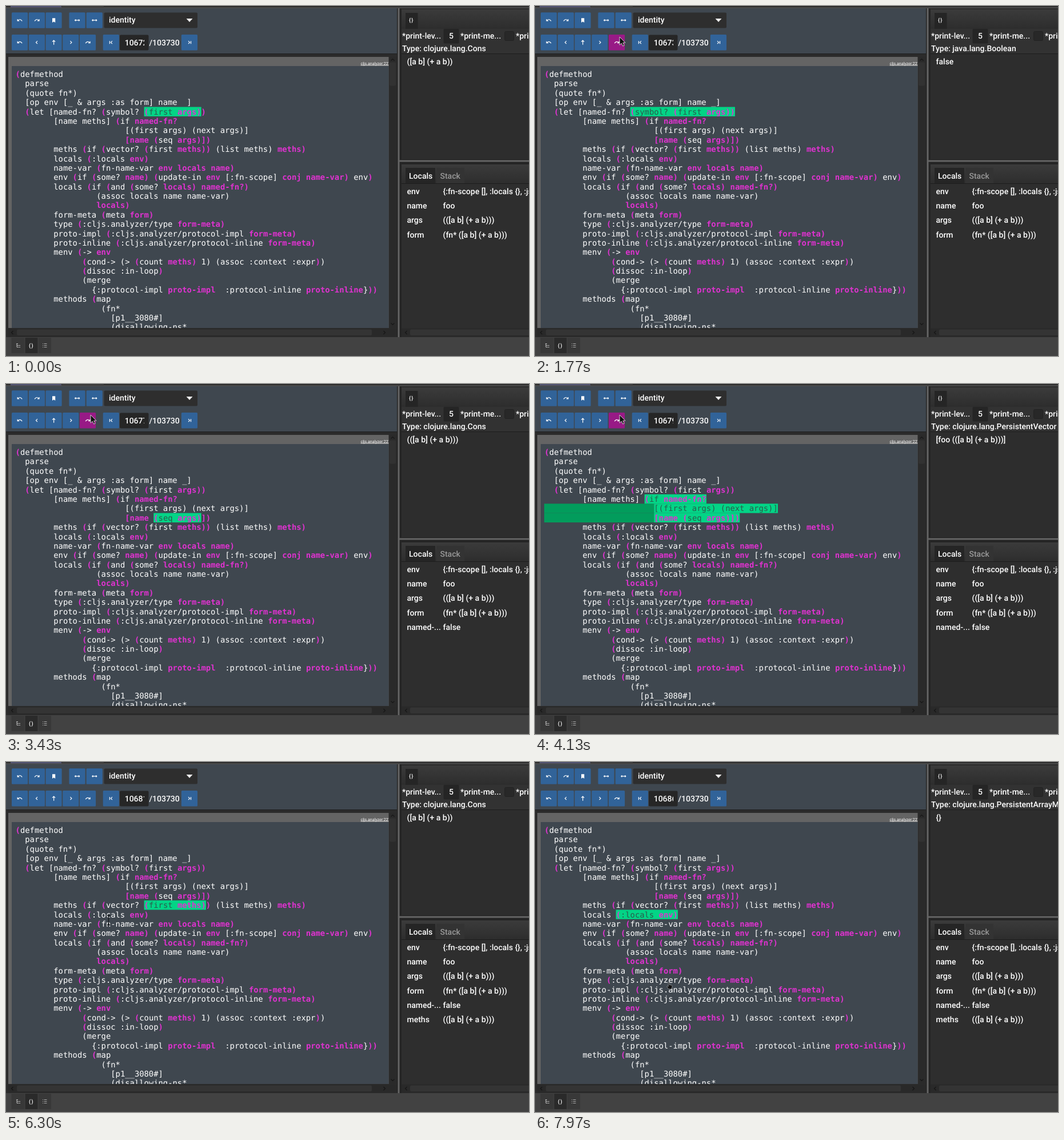
An HTML page for the animation above (8 s loop, 915 px wide and 612 px high).

```html
<!DOCTYPE html>
<html lang="en">
<head>
<meta charset="utf-8">
<title>Stepping debugger</title>
<style>
html, body { margin: 0; width: 100%; height: 100%; overflow: hidden; background: #2b2b2b; }
svg { display: block; width: 915px; height: 612px; }
text { white-space: pre; text-rendering: geometricPrecision; }
.ui { font: 500 14px Roboto, sans-serif; fill: #fff; }
.braces { font-size: 9.5px; letter-spacing: 1px; }
.code { font: 13.84px "DejaVu Sans Mono", monospace; fill: #fff; }
.code .hot { font-weight: bold; fill: #e032d0; }
.code.lit { fill: #2b5a4c; }
.icon { fill: none; stroke: #fff; stroke-width: 1.2; }
</style>
</head>
<body>
<svg id="stage" viewBox="0 0 915 612"></svg>
<script>
const LOOP = 8000, X0 = 16.6, CW = 8.333, Y0 = 111, LH = 16.38, BASE = 13.1;
const pad = n => ' '.repeat(n);

// "~" toggles the emphasised style
const lines = [
  '~(~defmethod',
  '  parse',
  '  (quote fn*)',
  '  [op env [_ & args :as form] name  ]',
  '  ~(~let [named-fn? ~(~symbol? ~(~first ~args))~',
  '        [name meths] ~(~if ~named-fn?',
  pad(23) + '[(first args) (next args)]',
  pad(23) + '~[name (~seq ~args)])',
  '        meths ~(~if ~(~vector? ~(~first ~meths))~ (list meths) ~meths)',
  '        locals ~(~:locals ~env)',
  '        name-var ~(~fn-name-var ~env locals name)',
  '        env ~(~if ~(~some? ~name)~ ~(~update-in ~env~ [:fn-scope] ~conj name-var)~ env~)~',
  '        locals ~(~if ~(~and ~(~some? ~locals)~ ~named-fn?)',
  pad(17) + '(assoc locals name name-var)',
  pad(17) + '~locals)',
  '        form-meta ~(~meta ~form)',
  '        type ~(~:cljs.analyzer/type ~form-meta)',
  '        proto-impl ~(~:cljs.analyzer/protocol-impl ~form-meta)',
  '        proto-inline ~(~:cljs.analyzer/protocol-inline ~form-meta)',
  '        menv ~(~-> ~env',
  pad(14) + '~(~cond-> (> ~(~count ~meths)~ 1) (assoc :context :expr~)~)',
  pad(14) + '~(~dissoc :in-loop~)',
  pad(14) + '(merge',
  pad(16) + '{:protocol-impl ~proto-impl~  :protocol-inline ~proto-inline~}~))',
  '        methods ~(~map',
  pad(18) + '(fn*',
  pad(20) + '[p1__3080#]',
  pad(20) + '(disallowing-ns*'
];

const CONS = 'clojure.lang.Cons', BOOL = 'java.lang.Boolean', VEC = 'clojure.lang.PersistentVector';
const ARG = '([a b] (+ a b))', ARGS = `(${ARG})`, PAIR = `[foo ${ARGS}]`;

// time, step, type, value, lit spans as [row, column, length]
const steps = [
  [0, 10672, CONS, ARG, [[4, 27, 12]]],
  [1130, 10673, BOOL, 'false', [[4, 18, 22]]],
  [1800, 10674, BOOL, 'false', [[5, 25, 9]]],
  [2450, 10675, 'clojure.lang.Symbol', 'foo', [[7, 24, 4]]],
  [2850, 10676, CONS, ARGS, [[7, 34, 4]]],
  [3400, 10677, CONS, ARGS, [[7, 29, 10]]],
  [4030, 10678, VEC, PAIR, [[7, 23, 17]]],
  [4090, 10679, VEC, PAIR, [[5, 21, 13], [6, 23, 26], [7, 23, 18]]],
  [4600, 10680, CONS, ARGS, [[8, 34, 5]]],
  [5530, 10681, CONS, ARG, [[8, 27, 13]]],
  [7000, 10686, 'clojure.lang.PersistentArrayMap', '{}', [[9, 15, 13]]]
];

// time, x, y of the pointer tip
const path = [
  [30, 312, 176], [250, 280, 150], [520, 190, 84], [770, 148, 54], [5680, 148, 54],
  [6020, 160, 150], [6270, 180, 275], [6400, 178, 279], [6750, 148, 267],
  [7770, 148, 267], [7960, 234, 385]
];

const esc = s => s.replace(/&/g, '&amp;').replace(/</g, '&lt;').replace(/>/g, '&gt;');
const rect = (x, y, w, h, fill, more = '') =>
  `<rect x="${x}" y="${y}" width="${w}" height="${h}" fill="${fill}" ${more}/>`;
const label = (x, y, s, more = '') => `<text class="ui" x="${x}" y="${y}" ${more}>${esc(s)}</text>`;
const braces = (x, y, s) => `<text class="ui braces" x="${x}" y="${y}">${s}</text>`;
const icon = (x, y, d, more = '') => `<path class="icon" transform="translate(${x} ${y})" d="${d}" ${more}/>`;
const rowTop = r => Y0 + r * LH;
const colX = c => X0 + c * CW;

function codeText() {
  return lines.map((line, r) => {
    let col = 0;
    return line.split('~').map((run, i) => {
      const lead = run.length - run.trimStart().length;
      const x = colX(col + lead);
      col += run.length;
      return run.trim() && `<text x="${x}" y="${rowTop(r) + BASE}"${i % 2 ? ' class="hot"' : ''}>${esc(run.trim())}</text>`;
    }).join('');
  }).join('');
}

const shapes = {
  undo: 'M-4 -2V1H-1M-4 1Q0 -4 4 1.5',
  redo: 'M4 -2V1H1M4 1Q0 -4 -4 1.5',
  mark: 'M-2 -3H2V3L0 1.5L-2 3Z',
  wide: 'M-4 0H4M-2.5 -1.5L-4 0L-2.5 1.5M2.5 -1.5L4 0L2.5 1.5',
  prev: 'M1 -2.5L-1.5 0L1 2.5',
  next: 'M-1 -2.5L1.5 0L-1 2.5',
  up: 'M0 4V-3.5M-2.5 -1L0 -3.5L2.5 -1',
  first: 'M-2.5 -2.5V2.5M2 -2.5L-.5 0L2 2.5',
  last: 'M2.5 -2.5V2.5M-2 -2.5L.5 0L-2 2.5'
};

function button(x, y, name, id = '') {
  return rect(x, y, 28.2, 27.5, '#316399', `rx="1.5" ${id}`) +
    icon(x + 14.2, y + 13.7, shapes[name], name === 'mark' ? 'style="fill:#fff"' : '');
}

const toolbar = [
  [10, 'undo'], [39.8, 'redo'], [69.4, 'mark'], [110.4, 'wide'], [140.6, 'wide']
].map(([x, n]) => button(x, 11.2, n)).join('') + [
  [10, 'undo'], [39.8, 'prev'], [69.4, 'up'], [99.2, 'next'], [128.9, 'redo', 'id="over"'],
  [169.7, 'first'], [306.8, 'last']
].map(([x, n, id]) => button(x, 50, n, id)).join('');

const locals = [
  ['env', '{:fn-scope [], :locals {}, :js-globals'], ['name', 'foo'], ['args', ARGS],
  ['form', `(fn* ${ARG})`], ['named-...', 'false'], ['meths', ARGS]
].map(([k, v], i) => {
  const y = 329 + i * 25.2;
  return `<g id="local${i}">${label(701.5, y, k)}${label(764.5, y, v)}</g>`;
}).join('');

const chevrons = [
  [676.5, 94, 'M-3 1.5L0 -1.5L3 1.5'], [676.5, 556, 'M-3 -1.5L0 1.5L3 -1.5'],
  [11, 571, 'M1.5 -3L-1.5 0L1.5 3'], [662, 571, 'M-1.5 -3L1.5 0L-1.5 3'],
  [700, 571, 'M1.5 -3L-1.5 0L1.5 3']
].map(([x, y, d]) => icon(x, y, d, 'style="stroke:#171717"')).join('');

const stage = document.getElementById('stage');
stage.innerHTML = `
<defs>
  <linearGradient id="bar" x2="0" y2="1"><stop stop-color="#3b3b3b"/><stop offset="1" stop-color="#2d2d2d"/></linearGradient>
  <clipPath id="pane">${rect(4, 89, 665.5, 474, '#000')}</clipPath>
  <clipPath id="field">${rect(200, 50, 42, 28, '#000')}</clipPath>
  <clipPath id="litArea"></clipPath>
</defs>
${rect(0, 0, 915, 612, '#2b2b2b')}
${rect(0, 2, 915, 2, '#4c4c4c')}
${rect(8, 0, 89, 2.5, '#50526f')}${rect(98, 0, 73, 2.5, '#3a3a3a')}
${rect(0, 4, 686, 79, '#3f474f')}${rect(0, 83, 686, 1, '#1f1f1f')}
${toolbar}
${rect(171.5, 11.5, 163.5, 27, '#2e2e2e', 'rx="2"')}${label(180, 29.4, 'identity')}
<path d="M315.5 22H326.5L321 28Z" fill="#f2f2f2"/>
${rect(199, 50.5, 50.5, 27, '#262626', 'rx="2"')}
<g clip-path="url(#field)">${label(207.7, 68.7, '', 'id="count"')}</g>
${label(250.5, 68.7, '/103730')}
${rect(4, 89, 665.5, 474, '#646464')}${rect(10, 105, 659.5, 458, '#3f474f')}
<g clip-path="url(#pane)">
  <text class="ui" x="620.5" y="102.5" style="font-size:7px;font-weight:400;text-decoration:underline">cljs.analyzer:227</text>
  <g class="code">${codeText()}<text id="dash" x="${colX(35)}" y="${rowTop(3) + BASE}">_</text></g>
  <g id="lit"></g>
  <g class="code lit" clip-path="url(#litArea)">${codeText()}</g>
</g>
${rect(670, 89, 13.5, 474, '#2a2a2a')}${rect(671, 98.5, 11, 41, '#323232', 'rx="2"')}
${rect(4, 564, 680, 13.5, '#292929')}${rect(19, 565.5, 621, 10.5, '#343434', 'rx="2"')}
${rect(684, 4, 8, 575, '#242424')}${rect(685.5, 4, 3, 575, '#646464')}
${rect(692, 6, 223, 34, 'url(#bar)')}${rect(699, 12, 21.5, 28, '#252525')}
${braces(705, 27.5, '{}')}
${rect(692, 40, 223, 44, '#323232')}${rect(692, 83.5, 223, 185, '#2d2d2d')}
${rect(692, 83, 223, 1, '#1d1d1d')}
${label(693, 57.4, '*print-lev...')}${rect(765.5, 40, 27, 25.5, '#252525', 'rx="2"')}${label(775, 57.4, '5')}
${label(795, 57.4, '*print-me...')}${rect(872.5, 44.5, 16, 16, '#282828', 'rx="2" stroke="#222"')}${label(892, 57.4, '*print-length')}
${label(693, 79.4, '', 'id="type"')}${label(701.5, 101.5, '', 'id="value"')}
${rect(690, 268, 225, 9, '#242424')}${rect(688, 269.5, 227, 3, '#646464')}
${rect(692, 277, 223, 34, 'url(#bar)')}${rect(699, 283, 52, 28, '#252525')}${rect(753, 283, 49, 27, '#333')}
${label(705, 301.7, 'Locals')}${label(759.5, 301.7, 'Stack', 'style="fill:#999"')}
${rect(692, 310.5, 223, 253, '#2e2e2e')}${rect(692, 310, 223, 1, '#1d1d1d')}
${locals}
${rect(692, 564, 223, 13.5, '#292929')}${rect(707, 565.5, 210, 10.5, '#343434', 'rx="2"')}
${chevrons}
${rect(0, 579, 915, 33, '#424242')}
${rect(9.5, 580, 23, 27, '#383838')}${rect(33.5, 580, 22, 27, '#2a2a2a')}${rect(56.5, 580, 22.5, 27, '#383838')}
${icon(21, 593.5, 'M-3 -3H0M-2 -3V3H1M-2 0H1M1.5 0H4M1.5 3H4', 'style="stroke-width:1;stroke:#bbb"')}
${braces(40, 596.8, '()')}
${icon(67.5, 593.5, 'M-3.5 -3H-2.5M-1 -3H4M-3.5 0H-2.5M-1 0H4M-3.5 3H-2.5M-1 3H4', 'style="stroke-width:1;stroke:#aaa"')}
<g id="pointer">
  <path id="arrow" d="M0 0V14.2L3.3 11.2L5.6 16L8 14.9L5.8 10.2H10Z" fill="#111" stroke="#ddd" stroke-width=".9"/>
  <path id="beam" d="M-2.5 -8Q0 -8 0 -6Q0 -8 2.5 -8M0 -6V7M-2.5 9Q0 9 0 7Q0 9 2.5 9" fill="none" stroke="#15191c" stroke-width="1.4"/>
  <path id="hand" d="M-.8 0Q.7 -1 1 1V4.5L5 5.2Q6.4 5.8 6 8L5 12H-.5L-3.5 7.5Q-3 6.3 -.8 7.4Z" fill="#111" stroke="#a8adb0" stroke-width=".7"/>
</g>`;

const $ = id => document.getElementById(id);
const show = (id, on) => $(id).setAttribute('visibility', on ? 'visible' : 'hidden');

function spanRects(spans) {
  return spans.map(([r, c, n]) => rect(colX(c), rowTop(r), n * CW, LH, '#03d486')).join('');
}

let current;
function setStep(step) {
  if (step === current) return;
  current = step;
  const [, count, type, value, spans] = step;
  const indent = spans.slice(1).map(([r, c]) => rect(X0 - .5, rowTop(r), c * CW + .5, LH, '#029c5c')).join('');
  $('lit').innerHTML = indent + spanRects(spans);
  $('litArea').innerHTML = spanRects(spans);
  $('count').textContent = count;
  $('type').textContent = 'Type: ' + type;
  $('value').textContent = value;
}

function pointerAt(t) {
  const i = path.findIndex(p => p[0] > t);
  if (i < 0) return path[path.length - 1].slice(1);
  if (i === 0) return path[0].slice(1);
  const [t0, x0, y0] = path[i - 1], [t1, x1, y1] = path[i];
  const k = (t - t0) / (t1 - t0);
  return [x0 + (x1 - x0) * k, y0 + (y1 - y0) * k];
}

function render(t) {
  setStep(steps.filter(s => s[0] <= t).pop());
  show('dash', t >= 1130);
  show('local4', t >= 1800);
  show('local5', t >= 4600);
  const [x, y] = pointerAt(t);
  const overCode = y > 105, hand = t >= 6700;
  $('pointer').setAttribute('transform', `translate(${x} ${y})`);
  show('arrow', t >= 30 && !overCode);
  show('beam', t >= 30 && overCode && !hand);
  show('hand', hand);
  const hover = t >= 30 && x > 128 && x < 157 && y > 50 && y < 78;
  $('over').setAttribute('fill', hover ? '#981a86' : '#316399');
}

const start = performance.now();
function tick() {
  render((performance.now() - start) % LOOP);
  requestAnimationFrame(tick);
}
tick();
</script>
</body>
</html>
```
